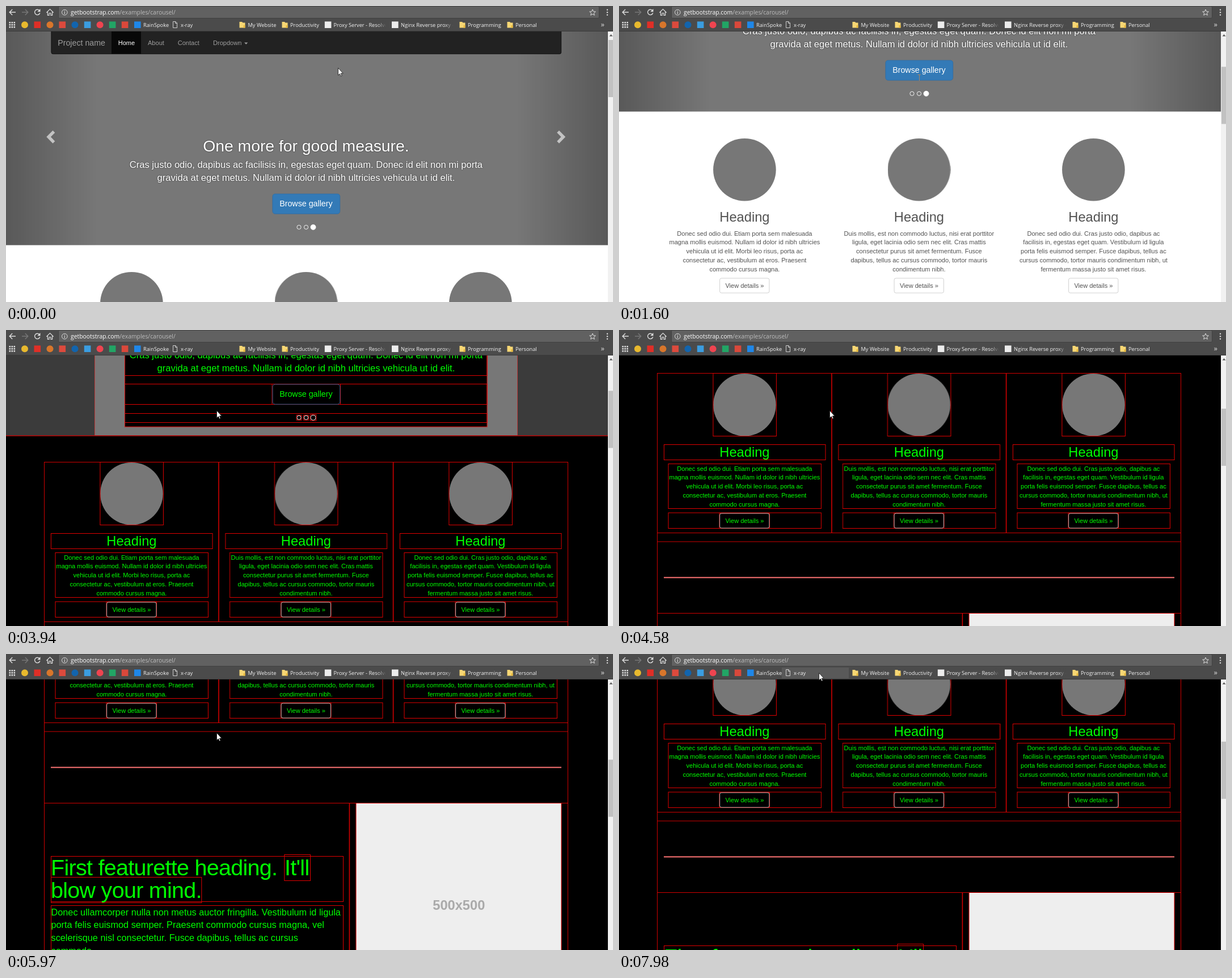
An HTML page that plays this animation: 1070 by 523 pixels, repeating every 8 s.

```html
<!DOCTYPE html>
<html lang="en">
<head>
<meta charset="utf-8">
<title>Carousel page with x-ray bookmark</title>
<style>
@property --s { syntax: "<number>"; inherits: true; initial-value: 0; }
html, body { margin: 0; width: 100%; height: 100%; overflow: hidden; background: #fff; }
svg { display: block; width: 1070px; height: 523px; font-family: "Liberation Sans", Arial, sans-serif; animation: scroll 8s step-end infinite; }
.page { transform: translateY(calc(var(--s) * -1px)); }
.thumb { transform: translateY(calc(var(--s) * .201px)); }
.mid { text-anchor: middle; }
.ui { font-family: "Open Sans", "Noto Sans", sans-serif; }
.box { fill: none; stroke: #e00000; }
.shade { filter: drop-shadow(0 .8px .8px rgba(0,0,0,.6)); }
.ink, .plain, .xray, .hover, .ripple, .arrow, .beam { animation: 8s step-end infinite; }
.ink { animation-name: ink; }
.plain { animation-name: leave; }
.xray { animation-name: enter; }
.hover { animation-name: hover; }
.ripple { animation-name: ripple; }
.arrow { animation-name: point; }
.beam { animation-name: beam; mix-blend-mode: difference; }

@keyframes scroll {
  0% { --s: 0 } 9.375% { --s: 79 } 14.25% { --s: 157 } 20% { --s: 236 }
  52.375% { --s: 315 } 57.25% { --s: 393 } 63% { --s: 472 } 68.75% { --s: 551 }
  74.625% { --s: 630 } 80.375% { --s: 551 } 84.375%, 100% { --s: 472 }
}
@keyframes ink { 37.5%, 100% { fill: #0f0 } }
@keyframes leave { 0% { opacity: 1 } 37.5%, 100% { opacity: 0 } }
@keyframes enter { 0% { opacity: 0 } 37.5%, 100% { opacity: 1 } }
@keyframes hover { 0%, 46.5% { opacity: 0 } 29.875%, 91.125%, 100% { opacity: 1 } }
@keyframes ripple {
  0% { r: 0; opacity: 1 } 35.625% { r: 18px; opacity: 1 } 36.625% { r: 46px; opacity: 1 }
  37.5% { r: 80px; opacity: .8 } 38.5% { r: 90px; opacity: .4 } 39.625%, 100% { r: 0; opacity: 0 }
}
@keyframes beam { 0%, 21%, 100% { opacity: 0 } 15.125% { opacity: 1 } }
@keyframes point {
  0% { transform: translate(585px,109px) }
  3.625% { transform: translate(572px,113px) }
  4.625% { transform: translate(548px,119px) }
  5.625% { transform: translate(533px,123px) }
  6.625% { transform: translate(527px,125px); opacity: 1 }
  15.125% { transform: translate(527px,125px); opacity: 0 }
  21% { transform: translate(518px,116px); opacity: 1 }
  21.875% { transform: translate(488px,88px) }
  22.875% { transform: translate(445px,50px) }
  23.875% { transform: translate(405px,20px) }
  24.875% { transform: translate(378px,4px) }
  25.875% { transform: translate(362px,1px) }
  26.875% { transform: translate(352px,3px) }
  27.875% { transform: translate(346px,9px) }
  28.875% { transform: translate(342px,16px) }
  29.875% { transform: translate(340px,23px) }
  31% { transform: translate(339px,27px) }
  31.75% { transform: translate(338px,30px) }
  35.625% { transform: translate(337px,34px) }
  39.625% { transform: translate(335px,30px) }
  46.5% { transform: translate(339px,48px) }
  47.5% { transform: translate(350px,85px) }
  48.375% { transform: translate(364px,120px) }
  49.25% { transform: translate(371px,142px) }
  60.125% { transform: translate(371px,139px) }
  86.25% { transform: translate(371px,134px) }
  87.25% { transform: translate(371px,120px) }
  88.125% { transform: translate(370px,98px) }
  89.125% { transform: translate(369px,70px) }
  90.125% { transform: translate(366px,47px) }
  91.125% { transform: translate(360px,27px) }
  92.125% { transform: translate(350px,10px) }
  93% { transform: translate(344px,4px) }
  94% { transform: translate(362px,23px) }
  96% { transform: translate(358px,27px) }
  99.75%, 100% { transform: translate(352px,33px) }
}
</style>
</head>
<body>
<svg viewBox="0 0 1070 523" xmlns="http://www.w3.org/2000/svg">
  <defs>
    <linearGradient id="left"><stop stop-opacity=".25"/><stop offset="1" stop-opacity="0"/></linearGradient>
    <linearGradient id="right"><stop stop-opacity="0"/><stop offset="1" stop-opacity=".25"/></linearGradient>
    <linearGradient id="fade"><stop stop-color="#4b4b4b" stop-opacity="0"/><stop offset=".6" stop-color="#4b4b4b"/></linearGradient>
    <clipPath id="tab"><rect x="287" y="24" width="118" height="19"/></clipPath>
  </defs>
  <g class="page" id="page"></g>
  <g id="bar"></g>
  <g class="beam"><path d="M526.5 121.5H532M529.5 121.5V132" fill="none" stroke="#fff" stroke-width=".8"/></g>
  <path class="arrow" d="M.5 .5V13.4L3.4 10.7 5.2 15 7.1 14.2 5.3 10H9.2Z" fill="#fff" stroke="#111" stroke-width=".8"/>
</svg>
<script>
const text = (x, y, size, str, more = '') => `<text x="${x}" y="${y}" font-size="${size}" ${more}>${str}</text>`;
const rect = (x, y, w, h, more = '') => `<rect x="${x}" y="${y}" width="${w}" height="${h}" ${more}/>`;
const dot = (x, y, r, more = '') => `<circle cx="${x}" cy="${y}" r="${r}" ${more}/>`;
const line = (d, color, more = '') => `<path d="${d}" fill="none" stroke="${color}" ${more}/>`;
const box = (x1, y1, x2, y2) => rect(x1, y1, x2 - x1, y2 - y1, 'class="box"');
const group = (name, ...parts) => `<g class="${name}">${parts.join('')}</g>`;
const fill = c => `fill="${c}"`;
const BODY = 11.05, LEAD = 16.57, MID = 528.9, COLUMN = 307.5;

const columns = [
  ['Donec sed odio dui. Etiam porta sem malesuada', 'magna mollis euismod. Nullam id dolor id nibh ultricies',
   'vehicula ut id elit. Morbi leo risus, porta ac', 'consectetur ac, vestibulum at eros. Praesent', 'commodo cursus magna.'],
  ['Duis mollis, est non commodo luctus, nisi erat porttitor', 'ligula, eget lacinia odio sem nec elit. Cras mattis',
   'consectetur purus sit amet fermentum. Fusce', 'dapibus, tellus ac cursus commodo, tortor mauris', 'condimentum nibh.'],
  ['Donec sed odio dui. Cras justo odio, dapibus ac', 'facilisis in, egestas eget quam. Vestibulum id ligula',
   'porta felis euismod semper. Fusce dapibus, tellus ac', 'cursus commodo, tortor mauris condimentum nibh, ut', 'fermentum massa justo sit amet risus.']
];
const feature = ['Donec ullamcorper nulla non metus auctor fringilla. Vestibulum id ligula',
  'porta felis euismod semper. Praesent commodo cursus magna, vel',
  'scelerisque nisl consectetur. Fusce dapibus, tellus ac cursus', 'commodo.'];

const chevron = 'M82.5 220 86.3 223.7 78.9 231.3 86.3 239 82.5 242.7 71.3 231.3Z';
const hero = () => rect(0, 0, 1061, 422.5, fill('#777')) +
  group('plain',
    rect(0, 0, 159, 422.5, fill('url(#left)')), rect(902, 0, 159, 422.5, fill('url(#right)')),
    `<path d="${chevron}" fill="#fff" opacity=".6"/><path d="${chevron}" fill="#fff" opacity=".6" transform="matrix(-1 0 0 1 1057.5 0)"/>`,
    rect(79.9, 40, 898.8, 44.7, 'rx="3" fill="#222" stroke="#080808" stroke-width=".8"'),
    rect(186, 45, 52, 39.5, fill('#080808')),
    text(91.3, 69.5, 14.2, 'Project name', fill('#9d9d9d')),
    text(197.7, 69, BODY, 'Home', fill('#fff')),
    [['About', 250], ['Contact', 302.7], ['Dropdown', 365]].map(([s, x]) => text(x, 69, BODY, s, fill('#9d9d9d'))).join(''),
    '<path d="M420 64.5H426.4L423.2 67.7Z" fill="#9d9d9d"/>') +
  group('xray',
    rect(0, 200, 156, 222.5, fill('#3b3b3b')), rect(901, 200, 160, 222.5, fill('#3b3b3b')),
    line('M156.5 200V422M901.5 200V422', '#bb3b3b'),
    rect(209.5, 200, 638.5, 207, 'fill="#000" stroke="#e00000"'),
    box(209.5, 270.5, 848, 316.5), box(209.5, 331.5, 848, 367.5), box(209.5, 383.5, 848, 399.5),
    box(469, 331.5, 589.5, 367.5)) +
  group('mid shade',
    text(MID, 257, 28.3, 'One more for good measure.', 'class="ink" fill="#fff"'),
    text(MID, 286.4, LEAD, 'Cras justo odio, dapibus ac facilisis in, egestas eget quam. Donec id elit non mi porta', 'class="ink" fill="#fff"'),
    text(MID, 309.1, LEAD, 'gravida at eget metus. Nullam id dolor id nibh ultricies vehicula ut id elit.', 'class="ink" fill="#fff"')) +
  group('plain', rect(469.9, 332, 118.8, 35.2, 'rx="4.5" fill="#337ab7" stroke="#2e6da4" stroke-width=".8"')) +
  group('xray', rect(470, 332, 118.8, 35.2, 'rx="4.5" fill="#000" stroke="#2e6da4" stroke-width=".9"')) +
  text(MID, 354.4, 14.25, 'Browse gallery', 'class="ink mid" fill="#fff"') +
  [516.5, 529, 541.5].map((x, i) => {
    const r = i < 2 ? 3.6 : 4.5, e = r + .8;
    return dot(x, 390.8, r, `fill="${i < 2 ? 'none' : '#fff'}" stroke="#fff" stroke-width=".9"`) +
      group('xray', dot(x, 390.8, r, 'fill="#000" stroke="#fff" stroke-width=".9"'), box(x - e, 390.8 - e, x + e, 390.8 + e));
  }).join('') +
  group('xray', line('M0 422.8H1061', '#e00000', 'stroke-width="1.2"'));

const column = (rows, i) => `<g transform="translate(${i * COLUMN})">` +
  dot(221.4, 525.2, 55.3, fill('#777')) +
  group('xray', box(165.9, 469.5, 277.4, 580.5), box(79.4, 595.5, 364, 622.5), box(87, 629.5, 356.4, 708.5), box(87, 716, 356.4, 743.5), box(177, 716.5, 265.5, 743.5)) +
  rect(177.6, 717, 87.3, 26, 'rx="3" fill="none" stroke="#ccc" stroke-width=".9"') +
  `<g class="mid ink" fill="#525252">` + text(221.4, 617.2, 23.67, 'Heading') +
  rows.map((s, k) => text(221.4, 641.5 + k * 15.78, BODY, s)).join('') +
  text(221.4, 733.9, BODY, 'View details »') + '</g></g>';

const featurette = () => group('xray',
  line('M67.5 469.5H990.5M67.5 469V1300M990.5 469V1300M67.5 751.5H990.5M67.5 767H990.5M67.5 893.5H990.5', '#d00000'),
  // neighbouring outlines meet here and form a thicker line
  line('M375 469.5V751.5M682.6 469.5V751.5M605.4 893V1300', '#d00000', 'stroke-width="1.6"'),
  rect(79, 829.4, 900, 2, fill('#ff7474')),
  rect(617, 893.5, 362, 362, 'fill="#eee" stroke="#e00000"'),
  text(798.3, 1082, 23.67, '500x500', 'class="mid" font-weight="700" fill="#aaa"'),
  box(79.5, 987.5, 594.5, 1067.5), box(490.8, 984.5, 536.5, 1030.5), box(79.5, 1024.5, 344.8, 1069.5), box(79.5, 1074.5, 594.5, 1167),
  '<g fill="#0f0"><g letter-spacing="-.69">', text(79, 1021.3, 39.45, 'First featurette heading.'),
  text(491, 1021.3, 39.45, 'It\'ll'), text(79, 1060.8, 39.45, 'blow your mind.'), '</g>',
  feature.map((s, k) => text(79.5, 1091.5 + k * 22.8, 16.3, s)).join(''), '</g>');

page.innerHTML = rect(0, 0, 1061, 1300, fill('#fff')) + group('xray', rect(0, 0, 1061, 1300, fill('#000'))) +
  hero() + featurette() + columns.map(column).join('');

const folder = x => `<path d="M${x} 28H${x + 4.5}L${x + 6} 29.5H${x + 10}V38.5H${x}Z" fill="#f7d774"/>` + rect(x + 7, 34, 3, 4.5, fill('#e8b93c'));
const label = (x, s) => text(x, 36.7, 9.25, s, fill('#f2f2f2'));
const marks = [[33, '#e8b92e'], [55.3, '#df2f27', 1], [77.5, '#d8762b'], [99.3, '#dc4a3d', 1], [121.5, '#1264ad'],
  [143.6, '#3b9de0', 1], [165.6, '#ef4450'], [187.6, '#22a565', 1], [209.6, '#d9483b', 1], [231.8, '#1f87e8', 1],
  [567.6, '#ececec', 1], [685.8, '#ececec', 1]];
const thin = 'stroke-width="1.4"';

bar.innerHTML = rect(0, 0, 1070, 45, fill('#4b4b4b')) + rect(0, 44, 1070, 1, fill('#3a3a3a')) +
  rect(92.5, .5, 953, 21, 'rx="2" fill="#616161" stroke="#404040"') +
  line('M17 11H6.5M11.2 6 6.2 11 11.2 16', '#ddd', thin) +
  line('M28 11H38.5M33.8 6 38.8 11 33.8 16', '#777', thin) +
  line('M58.8 7.8A4.7 4.7 0 1 0 59.8 12.3', '#ddd', thin) + '<path d="M60.5 5V10.2H55.3Z" fill="#ddd"/>' +
  line('M71.3 11.7 77.5 5.6 83.7 11.7M73.4 10.5V16.3H76V12.5H79V16.3H81.6V10.5', '#ddd', 'stroke-width="1.2"') +
  dot(103.3, 11.2, 4.8, 'fill="none" stroke="#ddd" stroke-width="1"') + line('M103.3 8.2V9.4M103.3 10.4V14', '#ddd', 'stroke-width="1.2"') +
  `<text class="ui" x="114" y="14.8" font-size="10.4" fill="#fff">getbootstrap.com<tspan fill="#bdbdbd">/examples/carousel/</tspan></text>` +
  line('M1034 6 1035.5 9.7 1039.3 10 1036.4 12.5 1037.3 16.3 1034 14.2 1030.7 16.3 1031.6 12.5 1028.7 10 1032.5 9.7Z', '#ddd') +
  [6.8, 11.3, 15.8].map(y => dot(1060, y, 1.2, fill('#ddd'))).join('') +
  group('hover', rect(287, 24, 118, 19, fill('#595959'))) +
  `<g clip-path="url(#tab)">${dot(331, 34, 0, 'class="ripple" fill="#676767"')}</g>` +
  [0, 1, 2].flatMap(i => [0, 1, 2].map(j => rect(5.5 + i * 4, 28 + j * 4, 2.6, 2.6, fill('#ddd')))).join('') +
  marks.map(([x, c, square]) => square ? rect(x - 5.8, 27.4, 11.6, 11.6, fill(c)) : dot(x, 33.2, 6, fill(c))).join('') +
  line('M294.5 27.5H299L301.5 30V38.5H294.5ZM298.5 27.5V30.5H301.5', '#ddd', 'stroke-width=".9"') +
  [411.5, 486.5, 799.5, 883.5].map(folder).join('') +
  '<g class="ui">' + label(242, 'RainSpoke') + label(308, 'x-ray') + label(426.5, 'My Website') + label(501, 'Productivity') +
  label(577.5, 'Proxy Server - Resolve') + label(696, 'Nginx Reverse proxy -') + label(814, 'Programming') + label(898, 'Personal') +
  text(1048.5, 37, 13, '»', fill('#ddd')) + '</g>' +
  rect(655, 25, 24, 18, fill('url(#fade)')) + rect(774, 25, 24, 18, fill('url(#fade)')) +
  rect(1061, 45, 9, 478, fill('#f1f1f1')) + '<path d="M1063.5 53.5 1066.5 50 1069.5 53.5Z" fill="#555"/>' +
  rect(1062, 60, 8, 101, 'class="thumb" fill="#c1c1c1"');
</script>
</body>
</html>
```
